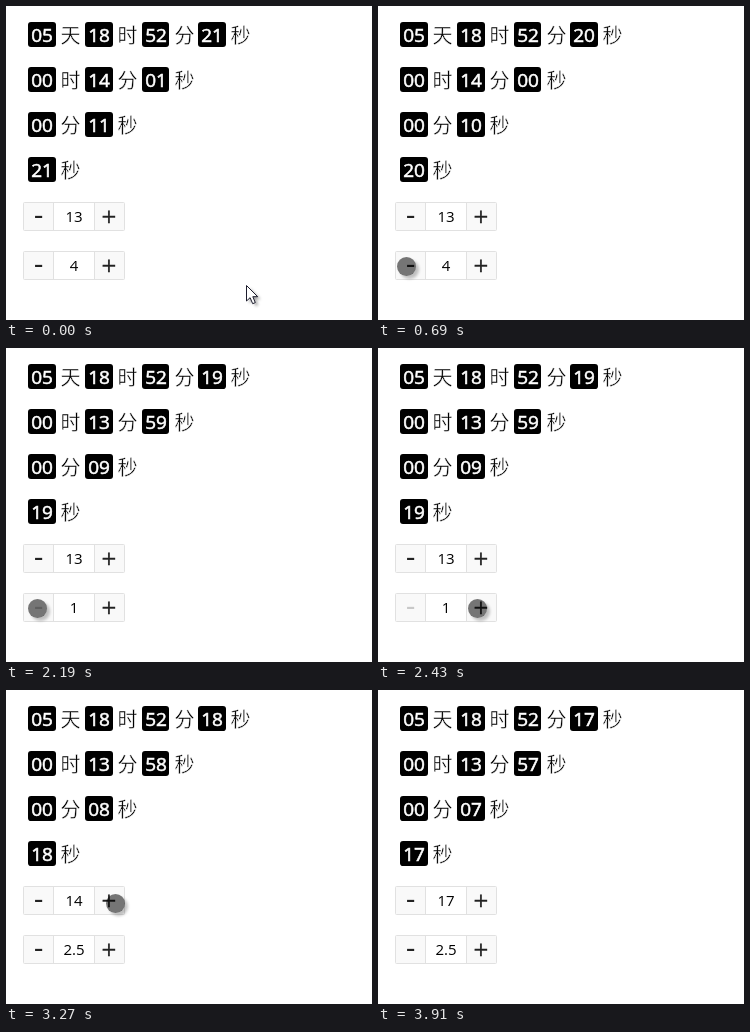
Recreate the animation shown at these times as an HTML page. Size 366x314 px, loop 4.51 s.

```html
<!DOCTYPE html>
<html lang="zh">
<head>
<meta charset="utf-8">
<title>Countdown and stepper</title>
<style>
html, body { margin: 0; width: 100%; height: 100%; overflow: hidden; background: #fff; }
svg { display: block; width: 100%; height: 100%; }
.num { font: 19px "Open Sans", "Noto Sans", sans-serif; fill: #fff; stroke: #fff; stroke-width: .6; text-anchor: middle; }
/* the white outline thins the strokes */
.unit { font: 300 20px "Noto Sans CJK SC", "Noto Sans CJK", sans-serif; fill: #000; stroke: #fff; stroke-width: .45; }
.val { font: 15px "Open Sans", "Noto Sans", sans-serif; fill: #000; text-anchor: middle; }
.minus { font: 27px "DejaVu Sans", sans-serif; text-anchor: middle; }
.plus { font: 19.5px "DejaVu Sans", sans-serif; fill: #222; stroke: #222; stroke-width: .3; text-anchor: middle; }
</style>
</head>
<body>
<svg id="stage" viewBox="0 0 366 314">
  <defs>
    <filter id="soft" x="-50%" y="-50%" width="200%" height="200%"><feGaussianBlur stdDeviation="1.7"/></filter>
    <mask id="outside" maskUnits="userSpaceOnUse" x="-20" y="-20" width="50" height="50">
      <rect x="-20" y="-20" width="50" height="50" fill="#fff"/><circle r="9.2" fill="#000"/>
    </mask>
  </defs>
</svg>
<script>
const LOOP = 4510, STEP = 60;
const stage = document.getElementById('stage');

function add(parent, tag, attrs, text) {
  const el = document.createElementNS('http://www.w3.org/2000/svg', tag);
  for (const k in attrs) el.setAttribute(k, attrs[k]);
  if (text) el.textContent = text;
  parent.appendChild(el);
  return el;
}

// Countdown rows: units shown and seconds left at the start
const SIZE = { 天: 86400, 时: 3600, 分: 60, 秒: 1 };
const rows = [
  ['天时分秒', 5 * 86400 + 18 * 3600 + 52 * 60 + 21],
  ['时分秒', 14 * 60 + 1],
  ['分秒', 11],
  ['秒', 21]
].map(([units, left], r) => {
  const y = 16 + 45 * r;
  const cells = [...units].map((unit, i) => {
    // box edges snap to whole pixels
    const at = 22.3 + 56.7 * i, x = Math.round(at), end = Math.round(at + 27.6);
    add(stage, 'rect', { x, y, width: end - x, height: 25, rx: 3 });
    add(stage, 'text', { x: x + 32.5, y: y + 20.5, class: 'unit' }, unit);
    return { unit, el: add(stage, 'text', { x: x + 14, y: y + 20, class: 'num' }) };
  });
  return { left, cells };
});

function stepper(y) {
  const line = { stroke: '#e1e1e1', fill: 'none' };
  add(stage, 'rect', { x: 17.5, y: y + .5, width: 101, height: 28, rx: 1, ...line, fill: '#f9f9f9' });
  add(stage, 'rect', { x: 47.5, y: y + .5, width: 41, height: 28, ...line, fill: '#fff' });
  const minus = add(stage, 'text', { x: 32.5, y: y + 22, class: 'minus', fill: '#222' }, '-');
  add(stage, 'text', { x: 103, y: y + 21.1, class: 'plus' }, '+');
  return { minus, val: add(stage, 'text', { x: 68, y: y + 20, class: 'val' }) };
}
const top13 = stepper(196), low4 = stepper(245);

const arrow = add(stage, 'g');
const ARROW = 'M0 0V15.5L3.6 12.2L6.2 18.2L8.8 17.1L6.3 11.2H11.2Z';
add(arrow, 'path', { d: ARROW, transform: 'translate(3 2.5)', fill: '#000', opacity: .35, filter: 'url(#soft)' });
add(arrow, 'path', { d: ARROW, fill: '#fff', stroke: '#1c1c2c' });

const dot = add(stage, 'g');
const shade = add(dot, 'g', { mask: 'url(#outside)' });
add(shade, 'circle', { cx: 3, cy: 3, r: 9.5, fill: '#000', opacity: .23, filter: 'url(#soft)' });
add(dot, 'circle', { r: 9.5, fill: '#000', opacity: .53 });

// Event times
const ticks = [690, 1670, 2760, 3730];
const lowDown = [890, 1090, 1290, 1350, 1550, 1730];
const lowUp = [2630, 2760, 2960];
const topUp = [3270, 3470, 3670, 3730];
const passed = (list, t) => list.filter(e => t >= e).length;

// Pointer moves: start time, number of steps, destination
const START = [240.5, 279.5];
const moves = [
  [200, 7, 28.5, 260.5],
  [2190, 1, 31.5, 260.5],
  [2250, 4, 99.5, 260.5],
  [2960, 1, 107.5, 241.5],
  [3020, 3, 109.5, 213.5],
  [3790, 2, 281.5, 296.5]
];
const DOT_ON = 560, DOT_OFF = 3790, GONE = 3910;

function pointer(t) {
  let [x, y] = START;
  for (const [at, steps, tx, ty] of moves) {
    if (t < at) break;
    const p = Math.min(1, (Math.floor((t - at) / STEP) + 1) / steps);
    const e = p * p * (3 - 2 * p);
    x += (tx - x) * e;
    y += (ty - y) * e;
  }
  return [x, y];
}

const show = (el, on) => el.setAttribute('visibility', on ? 'visible' : 'hidden');

function draw(t) {
  const n = passed(ticks, t);
  for (const { left, cells } of rows) {
    let rest = left - n;
    for (const { unit, el } of cells) {
      el.textContent = String(Math.floor(rest / SIZE[unit])).padStart(2, '0');
      rest %= SIZE[unit];
    }
  }
  const low = 4 + (passed(lowUp, t) - passed(lowDown, t)) / 2;
  low4.val.textContent = low;
  low4.minus.setAttribute('fill', low > 1 ? '#222' : '#c8c8c8');
  top13.val.textContent = 13 + passed(topUp, t);

  const [x, y] = pointer(t), onDot = t >= DOT_ON && t < DOT_OFF;
  for (const el of [arrow, dot]) el.setAttribute('transform', `translate(${x} ${y})`);
  show(dot, onDot);
  show(arrow, !onDot && t < GONE);
}

let begin;
function frame(now) {
  begin ??= now;
  draw((now - begin) % LOOP);
  requestAnimationFrame(frame);
}
draw(0);
requestAnimationFrame(frame);
</script>
</body>
</html>
```
